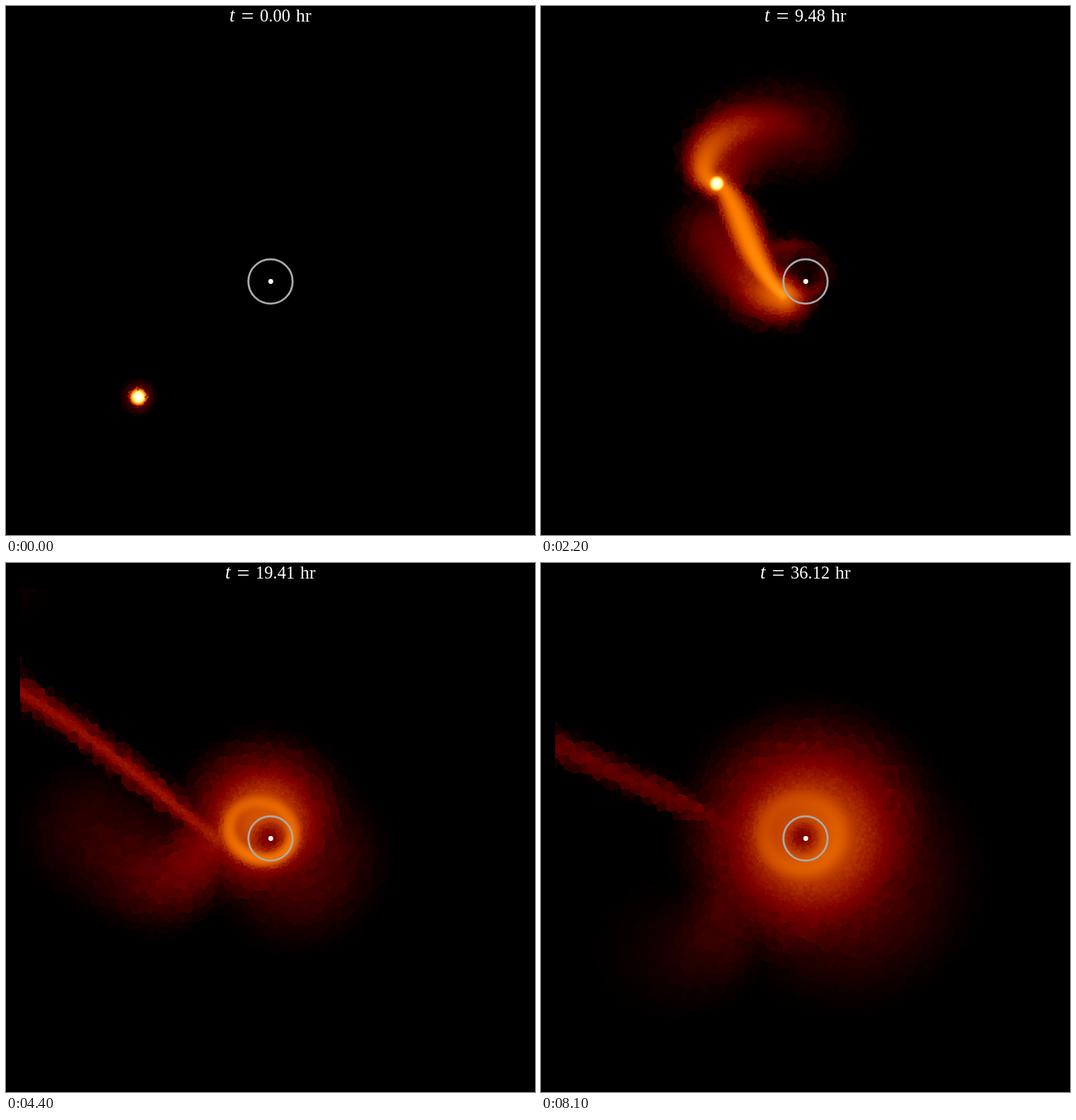
An HTML page with a canvas that plays this animation: 748 by 748 pixels, repeating every 8200 ms.

```html
<!DOCTYPE html>
<html lang="en">
<head>
<meta charset="utf-8">
<title>Star passing a black hole</title>
<style>
html, body { margin: 0; width: 100%; height: 100%; overflow: hidden; background: #000; }
canvas, svg { position: absolute; left: 0; top: 0; width: 748px; height: 748px; }
text { font: 24.5px "Liberation Serif", serif; fill: #fff; }
</style>
</head>
<body>
<canvas id="gas" width="748" height="748"></canvas>
<svg viewBox="0 0 748 748">
  <circle cx="374" cy="389.5" r="31.3" fill="none" stroke="#aaa" stroke-width="2.8"/>
  <circle cx="374.4" cy="389.5" r="3.4" fill="#fff"/>
  <text id="name" y="22" style="font-size:27px;font-style:italic">t</text>
  <text id="equals" y="24.5" style="font-size:32px">=</text>
  <text id="hours" y="22"></text>
  <text id="unit" y="22" style="font-size:26px">hr</text>
</svg>
<script>
const start = performance.now();
const N = 748, LEFT = 20, TOP = 35, LOOP = 8200, FREE = 16;
const $ = id => document.getElementById(id);
const ctx = $('gas').getContext('2d');
const image = ctx.createImageData(N, N);
const layer = new Float32Array(N * N), field = new Float32Array(N * N);

const mix = (a, b, t) => a + (b - a) * t;
const mixPoint = (p, q, t) => p.map((v, i) => mix(v, q[i], t));
const ramp = (k, from, to) => Math.max(0, Math.min(1, (k - from) / (to - from)));

let seed = 7;
const random = () => (seed = seed * 16807 % 2147483647) / 2147483647;
const grain = Float32Array.from({ length: N * N }, () => random() * 2 - 1);

// For each pixel, the index of the nearest point of a jittered grid.
function cells(size) {
  const n = Math.ceil(N / size) + 1, map = new Int32Array(N * N);
  const px = [], py = [];
  for (let i = 0; i < n * n; i++) {
    px.push(Math.min(N - 1, (i % n + random()) * size | 0));
    py.push(Math.min(N - 1, ((i / n | 0) + random()) * size | 0));
  }
  for (let y = 0; y < N; y++) for (let x = 0; x < N; x++) {
    const cx = x / size | 0, cy = y / size | 0;
    let best = 1e9;
    for (let j = Math.max(0, cy - 1); j <= cy + 1 && j < n; j++)
      for (let i = Math.max(0, cx - 1); i <= cx + 1 && i < n; i++) {
        const s = j * n + i, d = (px[s] - x) ** 2 + (py[s] - y) ** 2;
        if (d < best) { best = d; map[y * N + x] = py[s] * N + px[s]; }
      }
  }
  return map;
}
const coarse = cells(11), fine = cells(4);

// Parabolic orbit around the hole
function orbit(k) {
  const d = 2 * Math.sinh(Math.asinh(1.08 * (k - 12.5)) / 3), q = 30.6;
  return { x: 374 + q * (1 - d * d), y: 389 - 2 * q * d, angle: 2 * Math.atan(d) };
}

// Before the gas is free it grows and turns with the star.
function place(k, [x, y]) {
  if (k >= FREE) return [x, y, 1];
  const s = orbit(k), f = orbit(FREE), g = ramp(k, 9, FREE), turn = s.angle - f.angle;
  const c = Math.cos(turn) * g, n = Math.sin(turn) * g;
  return [s.x + (x - f.x) * c + (y - f.y) * n, s.y - (x - f.x) * n + (y - f.y) * c, g];
}

function eachPixel(x, y, w, paint) {
  const x0 = Math.max(0, Math.ceil(x - w)), x1 = Math.min(N - 1, x + w);
  const y1 = Math.min(N - 1, y + w);
  for (let j = Math.max(0, Math.ceil(y - w)); j <= y1; j++)
    for (let i = x0; i <= x1; i++) {
      const u = 1 - ((i - x) ** 2 + (j - y) ** 2) / (w * w);
      if (u > 0) paint(j * N + i, u);
    }
}

function blob(x, y, w, a, soft = true) {
  if (w > 1 && a > 0) eachPixel(x, y, w, (i, u) => {
    const v = a * (soft ? u * u : u);
    if (v > layer[i]) layer[i] = v;
  });
}

// Adds the finished layer to the field as a soft maximum.
function merge() {
  for (let i = 0; i < layer.length; i++) {
    let v = layer[i];
    if (v) { v *= v; v *= v; field[i] += v * v; layer[i] = 0; }
  }
}

// Cubic Bezier stream; width and strength are functions along it.
function stream(k, [p, q, r, s], steps, width, strength, soft) {
  for (let i = 0; i <= steps; i++) {
    const t = i / steps, m = 1 - t;
    const point = p.map((v, j) =>
      m * m * m * v + 3 * m * m * t * q[j] + 3 * m * t * t * r[j] + t * t * t * s[j]);
    const [x, y, g] = place(k, point);
    blob(x, y, width(t) * g, strength(t), soft);
  }
  merge();
}

function drawTails(step) {
  const k = Math.max(step, FREE), { x, y } = orbit(k);
  const open = ramp(k, 16, 26), drift = Math.max(0, k - 26) * 10;
  const fade = .17 + .4 * Math.exp((16 - k) / 19);

  // Outer tail, with a diffuse side
  const outer = [[x, y], [x - 14 - 54 * open, y - 33 + 52 * open],
    [x + 31 - 84 * open - drift, y - 43 - 118 * open], [x + 101 - drift, y + 32 - 228 * open]];
  const outerWidth = t => mix(15 + 42 * Math.sin(Math.PI * t ** .8), 24 + 80 * t ** 1.5, open);
  const outerFade = t => fade * (1 - .6 * t * t);
  stream(step, outer, 60, outerWidth, outerFade);
  stream(step, outer.map(p => [p[0] + 45 * open, p[1] + 15 * open]), 24,
    t => 1.5 * outerWidth(t), t => .62 * outerFade(t));

  // Inner tail, falling to the edge of the disk
  const end = mixPoint([342, 408], [298, 391], ramp(k, 26, 38));
  const sag = Math.max(0, k - 35) * .8;
  const inner = [[x, y], [x + 60 * open, y + 25 * (1 - open) + sag], [end[0] - 52, end[1] - 44], end];
  const thick = 27 + .2 * Math.max(0, k - 26);
  stream(step, inner, 90,
    t => mix(13 + 46 * Math.sin(Math.PI * t), mix(thick, 27, t), open),
    t => fade * mix(1, 1.12, t), k > 20);

  // Broad fan that swings round below the tail
  const angle = (-159 - 1.1 * (k - 26)) * Math.PI / 180, reach = 255 * ramp(k, 12, 28);
  const tip = [374 + reach * Math.cos(angle), 389 + reach * Math.sin(angle)];
  const low = mixPoint(tip, end, .5);
  const bend = [low[0] + 15, low[1] + 75 * open];
  stream(step, [tip, bend, bend, end], 16,
    t => mix(45, 118 - 42 * t, open), t => fade * mix(.5 - k / 230, 1, t));
}

function drawDisk(k) {
  const age = ramp(k, 26, 70), grown = ramp(k, 17, 27);
  const radius = 42 * Math.max(0, k - 20) ** .4;
  const [cx, cy] = mixPoint([352, 353], [382, 388], age);
  blob(cx, cy, radius, .42 * grown);
  merge();
  blob(cx + 48, cy + 52, radius, .16 * ramp(k, 26, 35));
  merge();

  const [rx, ry, w, tilt] = mixPoint([41, 33, 21, .5], [52, 48, 52, 0], age);
  const [ox, oy] = mixPoint([355, 374], [368, 383], age);
  const c = Math.cos(tilt), s = Math.sin(tilt);
  for (let p = 0; p < 2 * Math.PI; p += .06) {
    const x = rx * Math.cos(p), y = ry * Math.sin(p);
    blob(ox + x * c - y * s, oy + x * s + y * c, w,
      mix(.49, .39, age) * grown * (1 + .06 * Math.cos(p - 1)));
  }
  merge();
}

function drawStar(k) {
  const { x, y } = orbit(k);
  blob(x, y, mix(28 + k, 24 + 1.3 * (k - 16), ramp(k, 10, 16)), mix(.16, .47, ramp(k, 8, 16)), false);
  blob(x, y, 19, 1.02);
  merge();
}

function render(k) {
  field.fill(0);
  if (k > 9) drawTails(k);
  if (k > 17) drawDisk(k);
  drawStar(k);
  for (let i = 0; i < field.length; i++)
    if (field[i]) field[i] = Math.sqrt(Math.sqrt(Math.sqrt(field[i])));

  // Emptied space round the hole
  const [hx, hy, hw, ha] = mixPoint([380, 360, 48, 1], [370, 387, 33, .42], ramp(k, 16, 30));
  eachPixel(hx, hy, hw, (i, u) => { field[i] *= 1 - ha * ramp(k, 12, 16) * u * u; });

  const limit = .2 * ramp(k, 16, 26), px = image.data;
  for (let y = 0; y < N; y++) for (let x = 0; x < N; x++) {
    const i = y * N + x, c = coarse[i], f = fine[i];
    let v = 0;
    if (x >= LEFT && y >= TOP) {
      if (field[c] < limit) v = field[c] * (1 + .1 * grain[c]);
      else if (field[f] < .35) v = field[f] * (1 + .04 * grain[f]);
      else v = field[i];
    }
    px[i * 4] = 510 * v;
    px[i * 4 + 1] = 510 * v - 127.5;
    px[i * 4 + 2] = 510 * v - 255;
    px[i * 4 + 3] = 255;
  }
  ctx.putImageData(image, 0, 0);

  const hours = k * .4515, shift = hours < 10 ? 0 : 6;
  $('hours').textContent = hours.toFixed(2);
  $('name').setAttribute('x', 316 - shift);
  $('equals').setAttribute('x', 332.5 - shift);
  $('hours').setAttribute('x', 359 - shift);
  $('unit').setAttribute('x', 410 + shift);
}

let shown = -1;
function tick() {
  const k = Math.max(0, Math.floor((performance.now() - start) % LOOP / 100) - 1);
  if (k !== shown) render(shown = k);
  requestAnimationFrame(tick);
}
tick();
</script>
</body>
</html>
```
